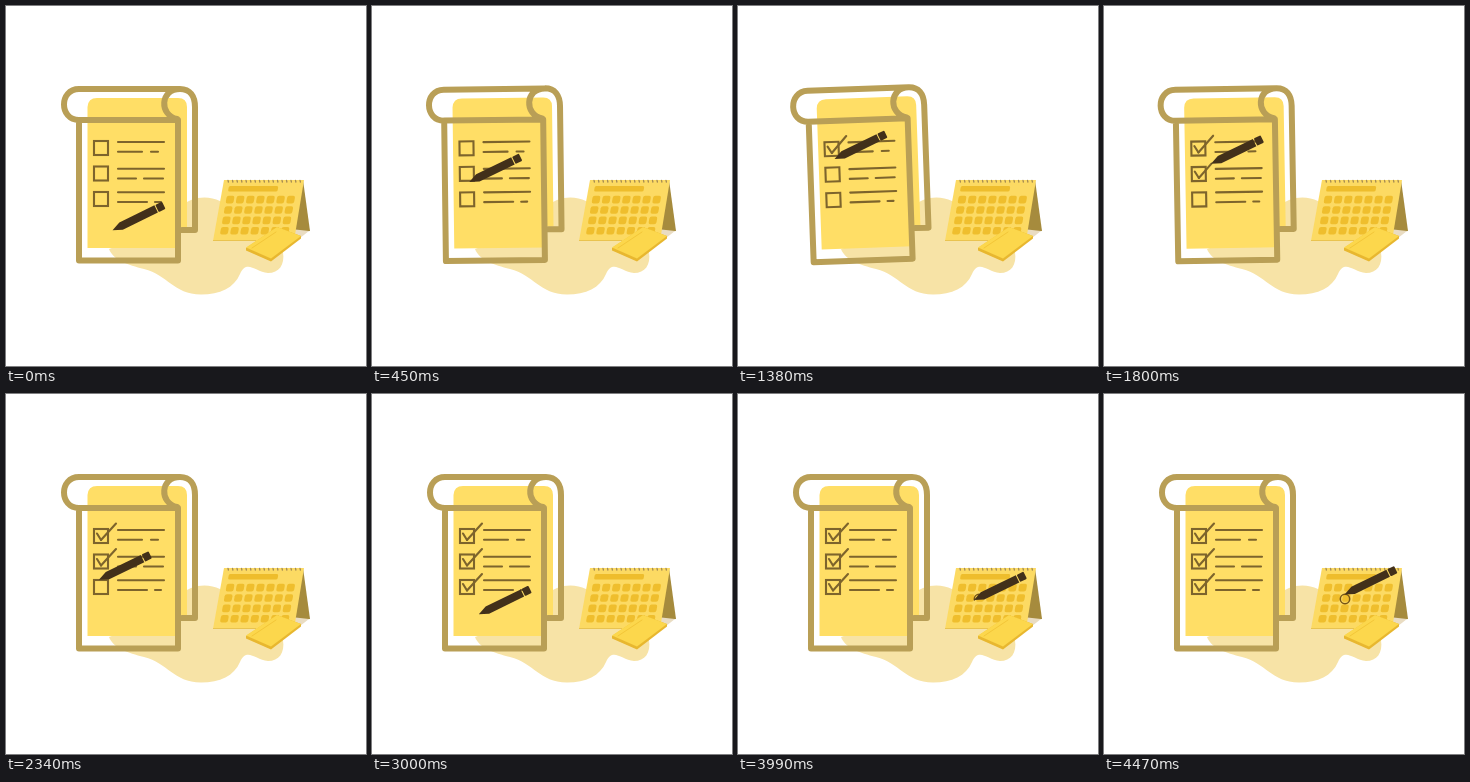
Recreate the animation shown at these times as an HTML page with a canvas. Size 360x360 px, loop 4.5 s.

```html
<!DOCTYPE html>
<html lang="en">
<head>
<meta charset="utf-8">
<title>Checklist and calendar</title>
<style>
html, body { margin: 0; width: 100%; height: 100%; overflow: hidden; background: #fff; }
canvas { display: block; width: 100vw; height: 100vh; }
</style>
</head>
<body>
<canvas id="stage" width="360" height="360"></canvas>
<script>
const ctx = document.getElementById('stage').getContext('2d');
const LOOP = 4500;
const PIVOT = { x: 123, y: 180 };
const GOLD = '#b99f56', INK = '#7d642c', PEN = '#42301a';
const CIRCLE = { x: 241, y: 205, r: 4.7, start: 3770, end: 4400 };

// time, x, y, whether the pen writes on the way to this point
const PEN_KEYS = [
  [0, 107, 224], [820, 91, 139.5], [960, 95, 146, true], [1180, 110, 129.5, true],
  [1520, 91, 165], [1640, 95, 171.5, true], [1850, 110, 155, true],
  [2480, 91, 190], [2600, 95, 196.5, true], [2780, 110, 180, true],
  [3050, 107, 224], [3130, 107, 224], [CIRCLE.start, CIRCLE.x, CIRCLE.y - CIRCLE.r]
];

const clamp = v => Math.max(0, Math.min(1, v));
const smooth = u => u * u * (3 - 2 * u);
const progress = (t, a, b) => smooth(clamp((t - a) / (b - a)));

function polygon(color, ...points) {
  ctx.fillStyle = color;
  ctx.beginPath();
  points.forEach(([x, y]) => ctx.lineTo(x, y));
  ctx.closePath();
  ctx.fill();
}

function line(x1, y1, x2, y2) {
  ctx.beginPath();
  ctx.moveTo(x1, y1);
  ctx.lineTo(x2, y2);
  ctx.stroke();
}

function stroke(color, width, cap = 'round') {
  ctx.strokeStyle = color;
  ctx.lineWidth = width;
  ctx.lineCap = cap;
  ctx.lineJoin = 'round';
}

function roundRect(color, x, y, w, h, r) {
  ctx.fillStyle = color;
  ctx.beginPath();
  ctx.roundRect(x, y, w, h, r);
  ctx.fill();
}

function drawBlob() {
  ctx.fillStyle = '#f7e3a6';
  ctx.fill(new Path2D(`M103 243 C107 254 122 259 138 263 C162 269 167 288 195 288.5
    C214 288.5 228 282 234 268 C241 253 249 266 262 267 C273 267 279 259 277 246
    L270 210 L225 205 C218 193 200 188 185 194 C174 198 165 215 145 228 Z`));
}

function drawCalendar() {
  polygon('#a68b3d', [297, 174], [304, 225], [288, 226]);
  polygon('#e9dcc2', [285, 223], [303, 225], [294, 232], [280, 232]);
  polygon('#fcda63', [218, 174], [298, 174], [288, 235], [207, 235]);
  stroke('#e9c350', 1, 'butt');
  line(207, 234.5, 250, 234.5);

  ctx.save();
  ctx.transform(1, 0, -0.18, 1, 0.18 * 174, 0);
  roundRect('#eebd2c', 224, 180, 49.5, 5.5, 1.5);
  for (let row = 0; row < 4; row++) {
    for (let col = 0; col < 7; col++) {
      roundRect('#efbe2d', 223.7 + col * 10.1, 189.8 + row * 10.4, 7.8, 7.6, 2);
    }
  }
  ctx.restore();

  stroke('#a58b52', 1.3);
  for (let i = 0; i < 17; i++) line(222 + i * 4.5, 174.3, 222.4 + i * 4.5, 176);
}

function drawEraser() {
  polygon('#e8b72f', [240, 242], [271, 221], [295, 230], [295, 232.5], [265, 255.5], [240, 244.5]);
  polygon('#fcd74c', [240, 241.5], [271, 221], [295, 230], [265, 252.5]);
  stroke('#f3c638', 1);
  line(246, 242, 270, 226);
}

function drawPage() {
  ctx.fillStyle = '#ffde66';
  ctx.fill(new Path2D('M81.5 242 V101 Q82 92 91 92 H172 Q181 92 181 101 V221 H172 V242 Z'));

  stroke(GOLD, 6);
  ctx.stroke(new Path2D(`M73 114 H172 V254.5 H73 Z
    M73 114 C53 114 53 83 73 83 H174 C184 83 189 90 189 101 V224 H176
    M174 83 C154 83 153 109 171 113`));

  // checkbox centre, first line, then dashes ten below it
  const rows = [
    [142, 136, [111, 137], [144, 153]],
    [167.5, 162.7, [111, 131], [137, 158]],
    [193, 186.2, [111, 142], [148, 156]]
  ];
  stroke(INK, 2.1);
  for (const [boxY, lineY, ...dashes] of rows) {
    ctx.lineJoin = 'miter';
    ctx.strokeRect(88, boxY - 7, 14, 14);
    line(112, lineY, 158, lineY);
    for (const [a, b] of dashes) line(a + 1, lineY + 9.8, b - 1, lineY + 9.8);
  }
}

// Draws the ticks made so far and returns the tip in page coordinates.
function writeTicks(t) {
  let tip = PEN_KEYS[0].slice(1, 3);
  stroke(INK, 2.1);
  for (let i = 1; i < PEN_KEYS.length; i++) {
    const [t0, x0, y0] = PEN_KEYS[i - 1];
    const [t1, x1, y1, writes] = PEN_KEYS[i];
    if (t < t0) break;
    const u = progress(t, t0, t1);
    tip = [x0 + (x1 - x0) * u, y0 + (y1 - y0) * u];
    if (writes) line(x0, y0, ...tip);
  }
  return tip;
}

function drawCircle(t) {
  const sweep = -2 * Math.PI * progress(t, CIRCLE.start, CIRCLE.end);
  const end = -Math.PI / 2 + sweep;
  stroke('#765516', 1.5);
  ctx.beginPath();
  ctx.arc(CIRCLE.x, CIRCLE.y, CIRCLE.r, -Math.PI / 2, end, true);
  ctx.stroke();
  return [CIRCLE.x + CIRCLE.r * Math.cos(end), CIRCLE.y + CIRCLE.r * Math.sin(end)];
}

function drawPen([x, y]) {
  ctx.save();
  ctx.translate(x, y);
  ctx.rotate(-26 * Math.PI / 180);
  polygon(PEN, [-0.5, 0], [9, -4], [48, -4], [48, 4], [9, 4]);
  roundRect(PEN, 49, -4, 7.5, 8, 1);
  ctx.restore();
}

function rotateAroundPivot([x, y], angle) {
  const dx = x - PIVOT.x, dy = y - PIVOT.y;
  const c = Math.cos(angle), s = Math.sin(angle);
  return [PIVOT.x + dx * c - dy * s, PIVOT.y + dx * s + dy * c];
}

function render(t) {
  const sway = t < 2340 ? -2.2 * Math.sin(Math.PI * t / 2340) ** 2 : 0;
  const angle = sway * Math.PI / 180;

  ctx.fillStyle = '#fff';
  ctx.fillRect(0, 0, 360, 360);
  drawBlob();
  drawCalendar();
  drawEraser();

  ctx.save();
  ctx.translate(PIVOT.x, PIVOT.y);
  ctx.rotate(angle);
  ctx.translate(-PIVOT.x, -PIVOT.y);
  drawPage();
  let tip = writeTicks(t);
  ctx.restore();

  tip = t > CIRCLE.start ? drawCircle(t) : rotateAroundPivot(tip, angle);
  drawPen(tip);
}

function tick() {
  const t = performance.now() % LOOP;
  render(Math.floor(t / 30) * 30);
  requestAnimationFrame(tick);
}
tick();
</script>
</body>
</html>
```
